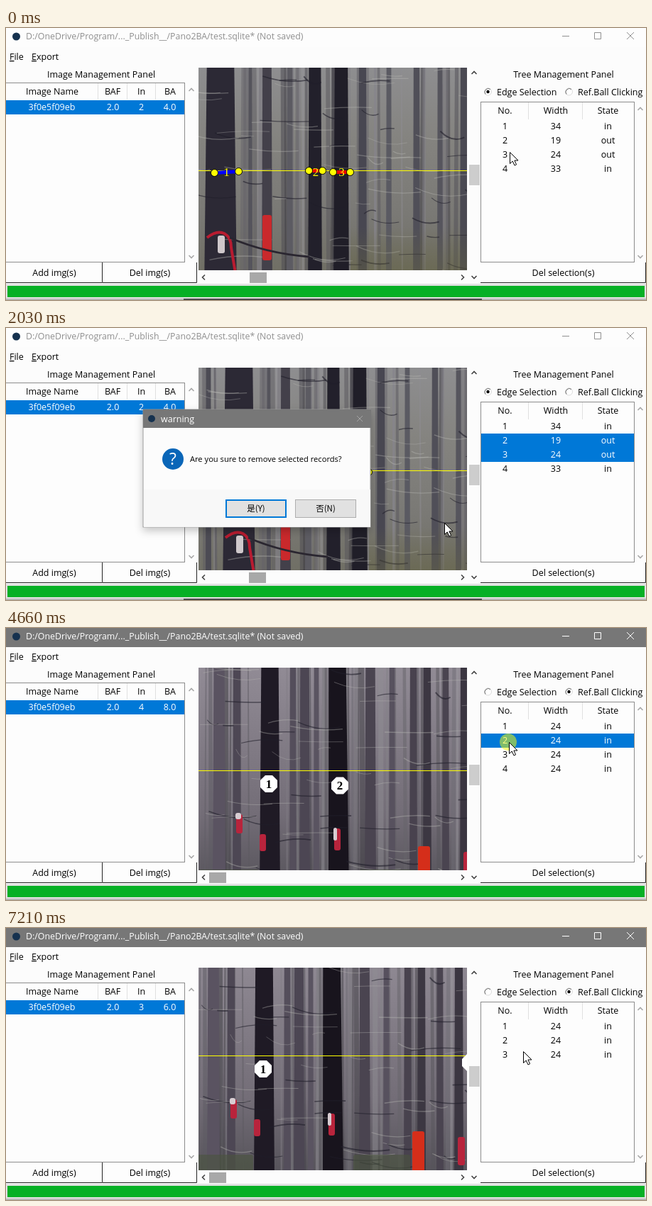
Recreate the animation shown at these times as an HTML page with a canvas. Size 901 by 384 pixels, loop 7.28 s.

```html
<!DOCTYPE html>
<html lang="en">
<head>
<meta charset="utf-8">
<title>Tree records</title>
<style>
html, body { margin: 0; width: 100%; height: 100%; overflow: hidden; background: #fcfcfc; }
#stage { position: absolute; left: 0; top: 0; width: 901px; height: 384px; overflow: hidden; }
#view { position: absolute; left: 271px; top: 56px; width: 378px; height: 286px; overflow: hidden; background: #55525c; }
canvas { position: absolute; left: 0; top: 0; }
svg { position: absolute; left: 0; top: 0; display: block; }
text { font: 12.5px "Open Sans", "Noto Sans", sans-serif; white-space: pre; }
.mid { text-anchor: middle; }
.num { font: 17px "Liberation Serif", serif; text-anchor: middle; }
.bold { font-weight: bold; }
.cjk { font: 11.5px "Noto Sans CJK SC", "Noto Sans CJK", sans-serif; text-anchor: middle; }
</style>
</head>
<body>
<div id="stage">
  <div id="view"></div>
  <svg id="ui" width="901" height="384" viewBox="0 0 901 384"></svg>
</div>
<script>
const LOOP = 7280;
const $ = id => document.getElementById(id);

// ---- markup helpers ----
const rect = (x, y, w, h, fill, more = '') =>
  `<rect x="${x}" y="${y}" width="${w}" height="${h}" fill="${fill}" ${more}/>`;
const box = (x, y, w, h, stroke, fill = 'none') =>
  rect(x + .5, y + .5, w - 1, h - 1, fill, `stroke="${stroke}"`);
const text = (x, y, s, more = '') => `<text x="${x}" y="${y}" ${more}>${s}</text>`;
const mid = (x, y, s, more = '') => text(x, y + 4.5, s, 'class="mid" ' + more);
const path = (d, stroke, w = 1, more = '') =>
  `<path d="${d}" fill="none" stroke="${stroke}" stroke-width="${w}" ${more}/>`;
const chevron = (x, y, turn, color) =>
  path('M-3.5 2L0 -1.5L3.5 2', color, 1.6, `transform="translate(${x} ${y}) rotate(${turn})"`);
const button = (x, y, w, h, label) =>
  rect(x, y, w, h, '#fdfdfd') +
  path(`M${x} ${y + h - .5}H${x + w - .5}V${y}`, '#222') + mid(x + w / 2, y + h / 2, label);
const radio = (x, id) =>
  `<circle cx="${x}" cy="90" r="5" fill="#fff" stroke="#dcdcdc"/>` +
  path(`M${x - 3.5} 93.5A5 5 0 0 1 ${x + 3.5} 86.5`, '#6a6a6a') +
  `<circle id="${id}" cx="${x}" cy="90" r="2.2"/>`;

// ---- photo stand-ins ----
function random(seed) {
  return () => (seed = (seed * 16807) % 2147483647) / 2147483647;
}

function forest({ seed, sky, trunks, extra }) {
  const c = document.createElement('canvas');
  c.width = 420; c.height = 320;
  const g = c.getContext('2d'), rnd = random(seed);
  const fade = g.createLinearGradient(0, 0, 0, 310);
  sky.forEach((s, i) => fade.addColorStop(i / (sky.length - 1), s));
  g.fillStyle = fade;
  g.fillRect(0, 0, 420, 320);

  const trunk = (x, w, color, lean = 0) => {
    g.fillStyle = color;
    g.beginPath();
    g.moveTo(x + w * .08 - lean, 0);
    g.lineTo(x + w * .92 - lean, 0);
    g.lineTo(x + w, 320);
    g.lineTo(x, 320);
    g.fill();
  };
  for (let i = 0; i < 50; i++) {
    const v = 55 + rnd() * 100 | 0;
    trunk(rnd() * 420, 2 + rnd() * 7, `rgba(${v},${v - 2},${v + 5},.5)`, rnd() * 4 - 2);
  }
  trunks.forEach(t => trunk(...t));

  const branch = (color, w) => {
    const x = rnd() * 420, y = rnd() * 300, l = 15 + rnd() * 60, d = rnd() * 26 - 8;
    g.strokeStyle = color;
    g.lineWidth = w;
    g.beginPath();
    g.moveTo(x, y);
    g.quadraticCurveTo(x + l / 2, y + d, x + l, y + d * .5);
    g.stroke();
  };
  for (let i = 0; i < 30; i++) branch('rgba(32,30,42,.6)', 1 + rnd());
  for (let i = 0; i < 45; i++) branch('rgba(185,184,180,.4)', .8 + rnd() * .6);
  extra(g);
  $('view').append(c);
  return c;
}

const patch = (g, color, ...list) => {
  g.fillStyle = color;
  list.forEach(([x, y, w, h]) => { g.beginPath(); g.roundRect(x, y, w, h, 3); g.fill(); });
};

const sceneA = forest({
  seed: 4177,
  sky: ['#8e8e90', '#84837f', '#7a7975', '#6d6c60'],
  trunks: [
    [34, 46, '#2c2935'], [115, 15, '#43404a'], [180, 20, '#22202b'], [216, 22, '#201e28'],
    [251, 12, '#484751'], [10, 8, '#4c4b54'], [96, 6, '#55545c'], [150, 9, '#5c5b62'],
    [290, 8, '#5a5a62'], [328, 10, '#504f58'], [362, 8, '#56555d'], [394, 12, '#4b4a53']
  ],
  extra(g) {
    const moss = g.createLinearGradient(0, 225, 0, 300);
    moss.addColorStop(0, 'rgba(100,98,62,0)');
    moss.addColorStop(1, 'rgba(100,98,62,.5)');
    g.fillStyle = moss;
    g.fillRect(240, 225, 180, 95);
    patch(g, '#c9292c', [116, 208, 13, 64]);
    g.lineWidth = 4;
    g.strokeStyle = '#b81c30';
    g.beginPath();
    g.moveTo(38, 240);
    g.bezierCurveTo(58, 224, 72, 236, 72, 254);
    g.lineTo(78, 290);
    g.stroke();
    patch(g, '#cfc8cb', [53, 237, 10, 25]);
    g.strokeStyle = '#2a2630';
    g.lineWidth = 3;
    g.beginPath();
    g.moveTo(70, 240);
    g.quadraticCurveTo(120, 262, 182, 267);
    g.stroke();
  }
});

const sceneB = forest({
  seed: 9203,
  sky: ['#918b95', '#827c86', '#736d77', '#56535a'],
  trunks: [
    [20, 18, '#5a5361'], [48, 12, '#4d4754'], [86, 29, '#1f1a25'], [128, 10, '#544e5b'],
    [142, 15, '#4c4653'], [162, 8, '#5a5461'], [183, 29, '#18141d', 2], [234, 16, '#4a4450'],
    [268, 9, '#57515e'], [297, 11, '#48424e'], [316, 12, '#3c3742'], [343, 10, '#4a4450'],
    [368, 13, '#3b3641'], [396, 14, '#47414d']
  ],
  extra(g) {
    patch(g, '#b8243c', [53, 207, 9, 27], [86, 235, 9, 24], [191, 227, 9, 31], [373, 260, 10, 40]);
    patch(g, '#d8cdd2', [52, 205, 8, 9], [190, 226, 5, 18]);
    patch(g, '#d52e1a', [309, 252, 17, 58]);
    patch(g, 'rgba(74,84,62,.6)', [0, 285, 85, 35], [226, 285, 80, 35]);
  }
});

// ---- interface ----
const title = on => {
  const ink = on ? '#fff' : '#8f8f8f';
  return rect(0, 0, 901, 27, on ? '#777' : '#fdfdfd') +
    '<circle cx="14.5" cy="12" r="5.5" fill="#16324f"/>' +
    text(28, 16, 'D:/OneDrive/Program/..._Publish__/Pano2BA/test.sqlite* (Not saved)',
      `fill="${ink}" style="font-size:12.35px"`) +
    path('M783 11.5H793M828.5 6.5H837.5V15.5H828.5ZM874 6L884 16M884 6L874 16', ink) +
    (on ? '' : rect(250, 382, 420, 2, '#4a4a4a'));
};

const octagon = (x, y, n) =>
  `<path d="M${x - 5} ${y - 12}h10l7 7v10l-7 7h-10l-7 -7v-10z" fill="#fff"/>` +
  text(x, y + 5.5, n, 'class="num bold"');

const edge = (x1, y1, x2, y2, n, color) =>
  path(`M${x1} ${y1}L${x2} ${y2}`, color, 5) +
  [[x1, y1], [x2, y2]].map(([x, y]) =>
    `<circle cx="${x}" cy="${y}" r="5" fill="#ff0" stroke="#000"/>`).join('') +
  text((x1 + x2) / 2, 208.5, n, 'class="num" fill="#ff0"');

const dialog =
  rect(193, 115, 320, 166, '#fcfcfc', 'id="body" stroke="#999" filter="url(#soft)"') +
  rect(193, 115, 321, 26, '#777') +
  '<circle cx="205" cy="128" r="5" fill="#16324f"/>' +
  text(218, 132.5, 'warning', 'fill="#fff"') +
  '<g id="content">' + rect(194, 228, 319, 53, '#f8f8f8') +
  path('M494 124L502 132M502 124L494 132', '#a5a5a5') +
  '<circle cx="235" cy="185" r="15" fill="#0a66b8"/>' +
  text(235, 193, '?', 'class="mid" fill="#fff" style="font-size:23px"') +
  text(259, 189, 'Are you sure to remove selected records?', 'style="font-size:11.15px"') +
  rect(310, 243, 84, 24, '#e1e1e1', 'stroke="#0078d7" stroke-width="2"') +
  box(407, 242, 86, 26, '#adadad', '#e1e1e1') +
  text(352, 259, '是(Y)', 'class="cjk"') + text(450, 259, '否(N)', 'class="cjk"') + '</g>';

const BLUE = '#0078d7', FRAME = '#8c8c8c', PALE = '#a8a8a8', DARK = '#444';

$('ui').innerHTML = `
<defs>
  <clipPath id="clip"><rect x="271" y="56" width="378" height="286"/></clipPath>
  <filter id="soft" x="-20%" y="-20%" width="140%" height="150%">
    <feDropShadow dx="0" dy="5" stdDeviation="6" flood-opacity=".22"/>
  </filter>
</defs>` +
  rect(0, 361, 901, 21, '#e2e2e2') + rect(0, 382, 901, 2, '#b9b9b9') +
  `<g id="idle">${title(false)}</g><g id="live">${title(true)}</g>` +
  text(5, 45, '<tspan text-decoration="underline">F</tspan>ile') +
  text(36, 45, '<tspan text-decoration="underline">E</tspan>xport') +
  mid(134, 65.5, 'Image Management Panel') + mid(785, 65.5, 'Tree Management Panel') +

  box(-1, 77, 253, 254, FRAME, '#fdfdfd') +
  path('M129.5 78V101M170.5 78V101M210.5 78V101', '#e0e0e0') +
  mid(65, 89.5, 'Image Name') + mid(150, 89.5, 'BAF') + mid(190.5, 89.5, 'In') + mid(231, 89.5, 'BA') +
  rect(0, 102, 251, 20, BLUE) +
  mid(64.5, 111.5, '3f0e5f09eb', 'fill="#fff"') + mid(150.5, 111.5, '2.0', 'fill="#fff"') +
  mid(190.5, 111.5, '', 'fill="#fff" id="inCount"') + mid(230.5, 111.5, '', 'fill="#fff" id="area"') +
  chevron(261, 87, 0, PALE) + chevron(261, 323, 180, PALE) +
  button(0, 331, 136, 29, 'Add img(s)') + button(136, 331, 133, 29, 'Del img(s)') +

  radio(678.5, 'byEdge') + text(691, 95, 'Edge Selection') +
  radio(792.5, 'byBall') + text(805, 95, 'Ref.Ball Clicking') +
  box(668, 104, 217, 227, FRAME, '#fdfdfd') +
  path('M735.5 105V129M811.5 105V129', '#e0e0e0') +
  mid(702.5, 116.5, 'No.') + mid(774, 116.5, 'Width') + mid(847.5, 116.5, 'State') +
  '<g id="rows"></g>' +
  chevron(893, 114, 0, PALE) + chevron(893, 323, 180, PALE) +
  button(668, 331, 233, 29, 'Del selection(s)') +

  chevron(659, 63, 0, DARK) + chevron(659, 352, 180, DARK) +
  chevron(278, 352, -90, DARK) + chevron(643, 352, 90, DARK) +
  rect(652, 193, 15, 29, '#cdcdcd', 'id="vThumb"') + rect(343, 345, 24, 15, '#a8a8a8', 'id="hThumb"') +
  rect(2, 364, 897, 16, '#06b025') +

  '<g clip-path="url(#clip)"><g id="marks"></g></g>' +
  `<g id="dialog">${dialog}</g>` +
  '<circle id="halo" r="12" fill="#ff0" fill-opacity=".5"/>' +
  '<path id="cursor" d="M.5 .5V16.5L4.2 13L7 19L9.6 17.8L6.9 12H12Z" fill="#fff" stroke="#000"/>';

// ---- timing ----
const bursts = [[80, 640, 8], [790, 870, 2], [1020, 1560, 8], [1710, 2410, 10], [2490, 3200, 10],
  [3270, 3270, 1], [3500, 4120, 9], [4270, 4970, 10], [5050, 5750, 10], [5810, 6510, 10], [6590, 7210, 9]];

function captured(t) {
  let seen = 0;
  for (const [from, to, n] of bursts) {
    if (t < from) break;
    const d = n > 1 ? (to - from) / (n - 1) : 1;
    seen = Math.min(to, from + Math.floor((t - from) / d + .2) * d);
  }
  return seen;
}

const pointer = [
  [0, 709, 175], [240, 706, 161], [480, 706, 161], [640, 709, 178], [1000, 709, 178],
  [1560, 759, 340], [1860, 759, 340], [2021, 617, 275], [2300, 350, 252], [2760, 350, 252],
  [2884, 364, 255], [3200, 380, 259], [3270, 392, 262], [3480, 392, 262], [4040, 806, 90],
  [4120, 808, 88], [4280, 808, 88], [4580, 708, 161], [4740, 708, 161], [4970, 714, 195],
  [5050, 720, 215], [5283, 752, 342], [5440, 752, 342], [5594, 741, 329], [5750, 655, 300],
  [6050, 350, 252], [6280, 350, 252], [6510, 375, 254], [6590, 385, 253], [7055, 741, 178], [7210, 728, 174]
];

function pointerAt(t) {
  const i = pointer.findIndex(p => p[0] > t);
  if (i < 0) return pointer[pointer.length - 1].slice(1);
  const [t0, x0, y0] = pointer[i - 1], [t1, x1, y1] = pointer[i];
  const k = (t - t0) / (t1 - t0);
  return [Math.round(x0 + (x1 - x0) * k), Math.round(y0 + (y1 - y0) * k)];
}

const within = (t, spans) => spans.some(([a, b]) => t >= a && t < b);
const clicks = [[320, 480], [790, 870], [1710, 1860], [2570, 2720], [4120, 4270], [4580, 4740], [5290, 5440], [6120, 6270]];
const inactive = [[0, 320], [1790, 2800], [5440, 6280]];
// open, content gone, closed
const prompts = [[1800, 2800, 2950], [5500, 6280, 6430]];

const all = [[34, 'in'], [19, 'out'], [24, 'out'], [33, 'in']];
const balls = n => Array(n).fill([24, 'in']);
const tables = [
  { at: 0, rows: all, sel: [], n: 2 },
  { at: 320, rows: all, sel: [1], n: 2 },
  { at: 790, rows: all, sel: [1, 2], n: 2 },
  { at: 2950, rows: [all[0], all[3]], sel: [], n: 2 },
  { at: 4270, rows: balls(4), sel: [], n: 4 },
  { at: 4650, rows: balls(4), sel: [1], n: 4 },
  { at: 6430, rows: balls(3), sel: [], n: 3 }
];

const rowMarkup = ({ rows, sel }) => rows.map(([w, state], i) => {
  const y = 139 + i * 20, on = sel.includes(i), ink = on ? 'fill="#fff"' : '';
  return (on ? rect(669, y - 10, 215, 20, BLUE) : '') +
    mid(702.5, y - .5, i + 1, ink) + mid(774, y - .5, w, ink) + mid(847.5, y - .5, state, ink);
}).join('');

const horizon = path('M200 201.5H720', '#ff0');

function marksMarkup(t) {
  if (t < 4270) {
    return horizon + edge(319.5, 204.5, 353.5, 202.5, 1, '#00f') +
      (t < 2950 ? edge(452.5, 201.5, 471.5, 201.5, 2, '#e00') + edge(486.5, 203.5, 510.5, 203.5, 3, '#e00') : '');
  }
  return horizon + octagon(370, 220, 1) +
    (t < 6430 ? octagon(470, 222.5, 2) + octagon(662, 211, 3) : octagon(662, 211, 2));
}

const show = (id, on) => { $(id).style.display = on ? '' : 'none'; };
const set = (id, name, v) => $(id).setAttribute(name, v);
const moments = [0, 320, 790, 2950, 4270, 4650, 4740, 6430];
let moment = -1;

// Rebuilds the parts that change only at hard cuts.
function cut(t) {
  const now = moments.filter(m => m <= t).pop();
  if (now === moment) return;
  moment = now;
  const table = tables.filter(s => s.at <= t).pop();
  $('rows').innerHTML = rowMarkup(table);
  $('inCount').textContent = table.n;
  $('area').textContent = (table.n * 2).toFixed(1);
  $('marks').innerHTML = marksMarkup(t);
  const ball = t >= 4270;
  const [dx, dy] = t < 320 ? [-26, 0] : t < 4740 ? [0, 0] : [-8, -21];
  set('marks', 'transform', `translate(${dx} ${dy})`);
  sceneA.style.display = ball ? 'none' : '';
  sceneB.style.display = ball ? '' : 'none';
  (ball ? sceneB : sceneA).style.transform = `translate(${dx}px, ${dy}px)`;
  set('vThumb', 'y', dy ? 195 : 193);
  set('hThumb', 'x', ball ? 286 : t < 320 ? 343 : 342);
}

function render(t) {
  cut(t);
  const idle = within(t, inactive);
  show('idle', idle);
  show('live', !idle);
  show('byEdge', t < 4120);
  show('byBall', t >= 4120);

  const open = prompts.find(([a, , c]) => t >= a && t < c);
  show('dialog', open);
  if (open) {
    const k = Math.min(1, (t - open[0]) / 180), s = .945 + .055 * k;
    set('dialog', 'opacity', k);
    set('dialog', 'transform', `translate(353 198) scale(${s}) translate(-353 -198)`);
    const full = t < open[1];
    show('content', full);
    set('body', 'fill', full ? '#fcfcfc' : 'none');
    set('body', 'filter', full ? 'url(#soft)' : 'none');
  }

  const [x, y] = pointerAt(captured(t));
  set('cursor', 'transform', `translate(${x} ${y})`);
  set('halo', 'transform', `translate(${x - 1} ${y})`);
  show('halo', within(t, clicks));
}

const start = performance.now();
function tick() {
  render((performance.now() - start) % LOOP);
  requestAnimationFrame(tick);
}
tick();
</script>
</body>
</html>
```
